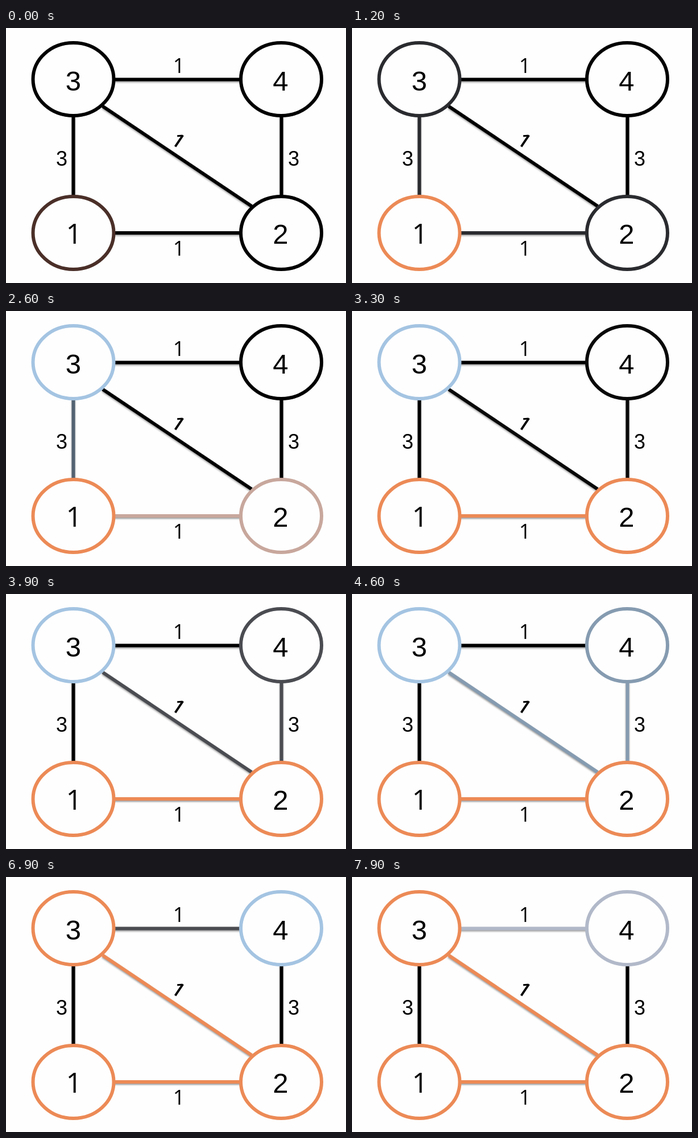
Animation, 598 px wide and 448 px high, one loop 8000 ms. Source, as an HTML page:

```html
<!DOCTYPE html>
<html lang="en">
<head>
<meta charset="utf-8">
<title>Graph search</title>
<style>
html, body { margin: 0; width: 100%; height: 100%; overflow: hidden; background: #fefefe; }
svg { display: block; width: 100%; height: 100%; }
line { stroke-width: 6; }
ellipse { fill: #fefefe; stroke-width: 6; }
#edges { filter: drop-shadow(0 2px 1.5px rgba(0, 0, 0, .4)); }
text { font-family: 'Liberation Sans', Arial, sans-serif; text-anchor: middle; }
.one { font-family: 'Open Sans', sans-serif; }
.node { font-size: 49px; }
.weight { font-size: 36px; }
</style>
</head>
<body>
<svg viewBox="0 0 598 448">
  <g id="edges">
    <line id="e13" x1="118.5" y1="154" x2="118.5" y2="296"/>
    <line id="e24" x1="484.5" y1="154" x2="484.5" y2="296"/>
    <line id="e34" x1="190" y1="90.5" x2="413" y2="90.5"/>
    <line id="e12" x1="190" y1="360" x2="413" y2="360"/>
    <line id="e23" x1="170" y1="137.5" x2="432" y2="313"/>
  </g>
  <g>
    <ellipse id="n3" cx="118.5" cy="90" rx="71" ry="64"/>
    <ellipse id="n4" cx="484" cy="90" rx="71" ry="64"/>
    <ellipse id="n1" cx="118.5" cy="360" rx="71" ry="64"/>
    <ellipse id="n2" cx="484" cy="360" rx="71" ry="64"/>
  </g>
  <g class="node">
    <text x="118.5" y="109.5">3</text>
    <text x="483" y="109.5">4</text>
    <text class="one" x="119.5" y="378.5">1</text>
    <text x="483" y="378.5">2</text>
  </g>
  <g class="weight">
    <text x="98" y="242">3</text>
    <text x="506" y="242">3</text>
    <text class="one" x="304" y="78.5">1</text>
    <text class="one" x="304" y="399.5">1</text>
    <text class="one" transform="translate(301.5 196.5) rotate(34)" x="2" y="12" font-size="34" font-weight="600">1</text>
  </g>
</svg>
<script>
const LOOP = 8000, STEP = 100;
const black = [0, 0, 0], gray = [74, 76, 82], brown = [74, 47, 40];
const blue = [164, 196, 226], orange = [236, 138, 86];

// Each fade: start, end, new colour, parts
const fades = [
  [-300, 0, brown, 'n1'],
  [0, 750, orange, 'n1'],
  [950, 1390, gray, 'n2 n3 e12 e13'],
  [1390, 2050, blue, 'n2 n3 e12 e13'],
  [2050, 3150, orange, 'n2 e12'],
  [2050, 3150, black, 'e13'],
  [3220, 3900, gray, 'n4 e23 e24'],
  [3900, 4970, blue, 'n4 e23 e24'],
  [5300, 6500, orange, 'n3 e23'],
  [5300, 6500, black, 'e24'],
  [6500, 6900, gray, 'e34'],
  [6900, 7500, blue, 'e34'],
  [7700, 8800, orange, 'n4 e34']
].map(([start, end, color, ids]) => ({ start, end, color, ids: ids.split(' ') }));

const parts = [...document.querySelectorAll('line, ellipse')];
const mix = (a, b, k) => a.map((v, i) => v + (b[i] - v) * k);

function colorAt(id, t) {
  let color = black;
  for (const f of fades) {
    if (!f.ids.includes(id)) continue;
    const k = Math.min(1, Math.max(0, (t - f.start) / (f.end - f.start)));
    color = mix(color, f.color, k);
  }
  return `rgb(${color.map(Math.round)})`;
}

function draw(now) {
  const t = Math.floor((now % LOOP) / STEP) * STEP;
  for (const part of parts) part.style.stroke = colorAt(part.id, t);
  requestAnimationFrame(draw);
}
draw(0);
</script>
</body>
</html>
```
